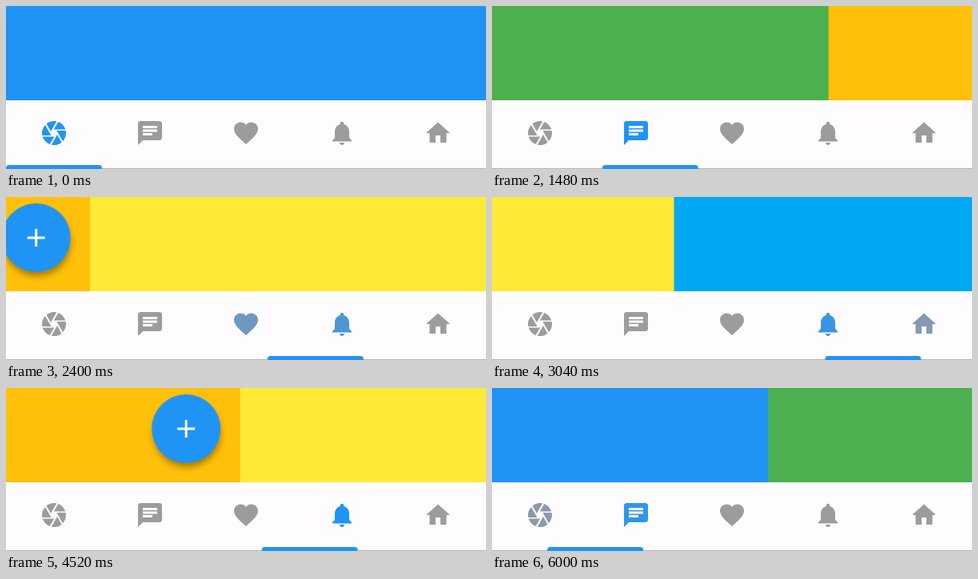
Write an HTML page that moves like this. It is 600 by 204 pixels and loops after 6040 ms.

```html
<!DOCTYPE html>
<html lang="en">
<head>
<meta charset="utf-8">
<title>Swipeable tab bar</title>
<style>
html, body { margin: 0; width: 100%; height: 100%; overflow: hidden; background: #fefcff; }
svg { display: block; width: 600px; height: 204px; }
</style>
</head>
<body>
<svg viewBox="0 0 600 204">
  <defs>
    <filter id="shadow" x="-30%" y="-30%" width="160%" height="170%">
      <feGaussianBlur stdDeviation="4.5"/>
    </filter>
  </defs>
  <g id="pages"></g>
  <g id="fab">
    <circle cx="1" cy="57" r="42" fill="#000" opacity=".36" filter="url(#shadow)"/>
    <circle cy="51" r="43" fill="#2094f5"/>
    <path d="M-11 51H11M0 40V62" stroke="#fff" stroke-width="3"/>
  </g>
  <rect y="118" width="600" height="86" fill="#fefcff"/>
  <g id="icons"></g>
  <rect y="203" width="600" height="1" fill="#b4b2b5"/>
  <path id="indicator" d="M0 204V203a4 4 0 0 1 4-4H116a4 4 0 0 1 4 4V204z" fill="#2094f5"/>
</svg>
<script>
const LOOP = 6040, WIDTH = 600, TAB = 120;
const LAG = 50;          // indicator delay, ms
const FADE = 200;        // icon colour change, ms
const RATE = 0.00907;    // settling rate after release, per ms
const LEFT = 1 / 3;      // part of the page remaining at release
const SPEED = LEFT * RATE;
const GRAY = [157, 155, 158], BLUE = [32, 148, 245];

const pageColors = ['#2094f5', '#4caf50', '#ffc009', '#ffea38', '#03a8f5'];
const iconPaths = [
  'M9.4 10.5l4.77-8.26C13.47 2.09 12.75 2 12 2c-2.4 0-4.6.85-6.32 2.25l3.66 6.35.06-.1zM21.54 9c-.92-2.92-3.15-5.26-6-6.34L11.88 9h9.66zm.26 1h-7.49l.29.5 4.76 8.25C21 16.97 22 14.61 22 12c0-.69-.07-1.35-.2-2zM8.54 12l-3.9-6.75C3.01 7.03 2 9.39 2 12c0 .69.07 1.35.2 2h7.49l-1.15-2zm-6.08 3c.92 2.92 3.15 5.26 6 6.34L12.12 15H2.46zm11.27 0l-3.9 6.76c.7.15 1.42.24 2.17.24 2.4 0 4.6-.85 6.32-2.25l-3.66-6.35-.93 1.6z',
  'M20 2H4c-1.1 0-2 .9-2 2v18l4-4h14c1.1 0 2-.9 2-2V4c0-1.1-.9-2-2-2zM6 9h12v2H6V9zm8 5H6v-2h8v2zm4-6H6V6h12v2z',
  'M12 21.35l-1.45-1.32C5.4 15.36 2 12.28 2 8.5 2 5.42 4.42 3 7.5 3c1.74 0 3.41.81 4.5 2.09C13.09 3.81 14.76 3 16.5 3 19.58 3 22 5.42 22 8.5c0 3.78-3.4 6.86-8.55 11.54L12 21.35z',
  'M12 22c1.1 0 2-.9 2-2h-4c0 1.1.89 2 2 2zm6-6v-5c0-3.07-1.64-5.64-4.5-6.32V4c0-.83-.67-1.5-1.5-1.5s-1.5.67-1.5 1.5v.68C7.63 5.36 6 7.92 6 11v5l-2 2v1h16v-1l-2-2z',
  'M10 20v-6h4v6h5v-8h3L12 3 2 12h3v8z'
];

// Each swipe: finger starts moving, finger lets go, direction.
const swipes = [
  [505, 907, 1], [1320, 1602, 1], [2050, 2330, 1], [2780, 3056, 1],
  [3525, 3800, -1], [4325, 4580, -1], [5000, 5270, -1], [5752, 6031, -1]
].map(([start, release, dir]) => ({ start, release, dir }));

const $ = id => document.getElementById(id);
function add(parent, tag, attrs) {
  const node = document.createElementNS('http://www.w3.org/2000/svg', tag);
  for (const key in attrs) node.setAttribute(key, attrs[key]);
  return parent.appendChild(node);
}
const pages = pageColors.map(fill =>
  add($('pages'), 'rect', { width: WIDTH + 1, height: 118, fill }));
const icons = iconPaths.map((d, i) =>
  add($('icons'), 'path', { d, transform: `translate(${i * TAB + 42} 141) scale(1.5)` }));

// Accelerate to a steady drag, then settle exponentially at matching speed.
function progress({ start, release }, t) {
  if (t <= start) return 0;
  if (t >= release) return 1 - LEFT * Math.exp(-RATE * (t - release));
  const ramp = 2 * (release - start - (1 - LEFT) / SPEED);
  const u = t - start;
  return u < ramp ? SPEED * u * u / (2 * ramp) : SPEED * (u - ramp / 2);
}
const position = t => swipes.reduce((sum, s) => sum + s.dir * progress(s, t), 0);

// The selected tab changes when a swipe passes the middle of the page.
const switchTime = s => s.release - (0.5 - LEFT) / SPEED;

function iconLevels(t) {
  const levels = [1, 0, 0, 0, 0];
  let tab = 0;
  for (const s of swipes) {
    const k = Math.min(1, Math.max(0, (t - switchTime(s)) / FADE));
    if (k === 0) break;
    levels[tab] = 1 - k;
    tab += s.dir;
    levels[tab] = k;
  }
  return levels;
}
const tint = k => `rgb(${GRAY.map((g, i) => Math.round(g + (BLUE[i] - g) * k))})`;

function render(t) {
  const pos = position(t);
  pages.forEach((page, i) => page.setAttribute('x', (i - pos) * WIDTH));
  $('fab').setAttribute('transform', `translate(${(2 - pos) * WIDTH + 532.5} 0)`);
  $('indicator').setAttribute('transform', `translate(${position(t - LAG) * TAB} 0)`);
  iconLevels(t).forEach((k, i) => icons[i].setAttribute('fill', tint(k)));
}

const began = performance.now();
function tick() {
  render((performance.now() - began) % LOOP);
  requestAnimationFrame(tick);
}
tick();
</script>
</body>
</html>
```
